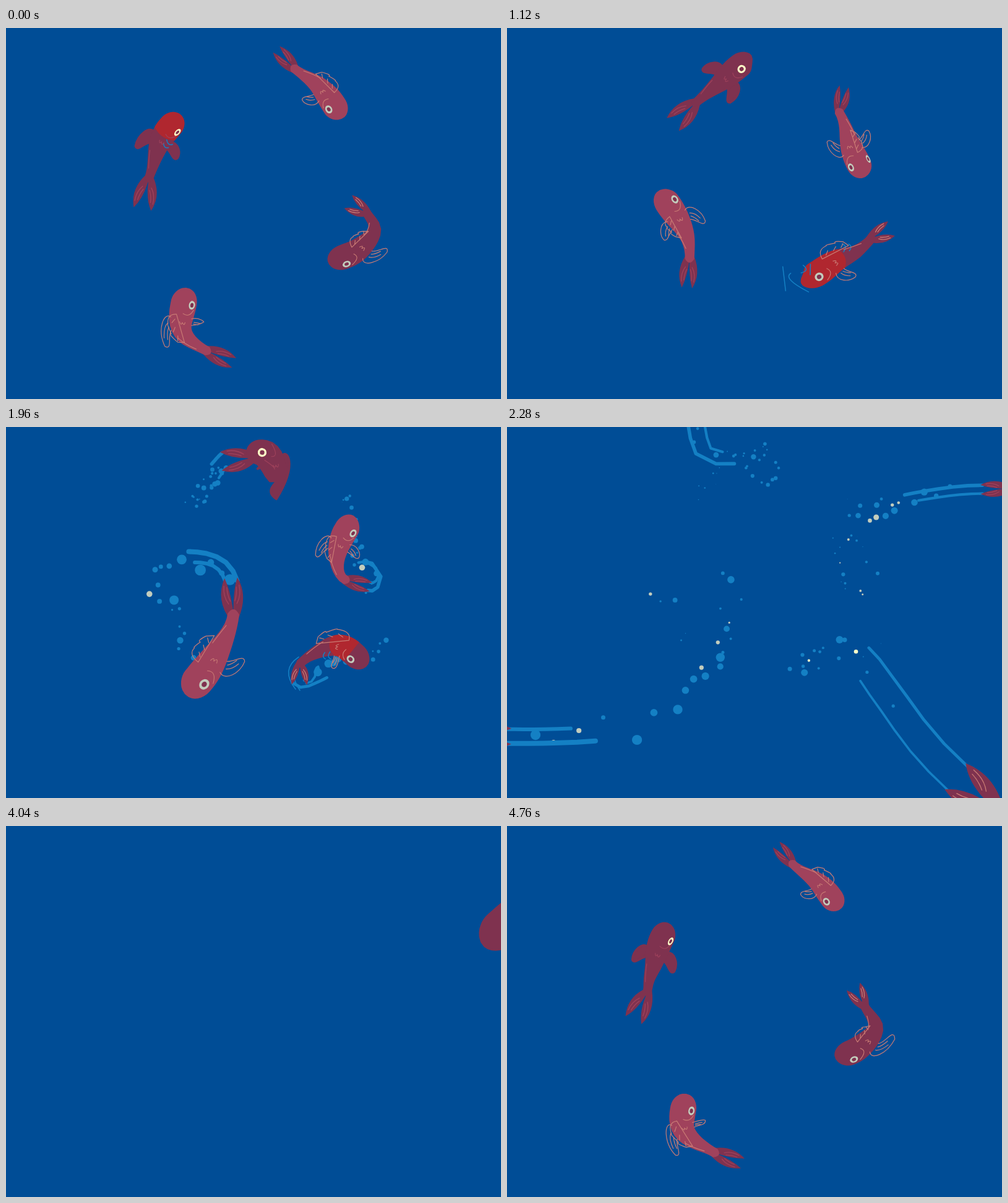
An HTML page for the animation above (4.84 s loop, 800 px wide and 600 px high).

```html
<!DOCTYPE html>
<html lang="en">
<head>
<meta charset="utf-8">
<title>Koi pond</title>
<style>
html, body { margin: 0; width: 100%; height: 100%; overflow: hidden; background: #004d96; }
svg { display: block; width: 100%; height: 100%; }
</style>
</head>
<body>
<svg id="pond" viewBox="0 0 800 600" fill="none" stroke-linecap="round" stroke-linejoin="round"></svg>
<script>
const LOOP = 4840, DARK = '#7f324f', PINK = '#a0425c', RED = '#b0272f';
const BLUE = '#1480c4', LINE = '#c97b74', PALE = '#c3cdbd', CREAM = '#ffffc8';

const RAD = Math.PI / 180;
const clamp = (v, a, b) => Math.max(a, Math.min(b, v));
const rand = n => { const s = Math.sin(n * 127.1 + 3.7) * 43758.5453; return s - Math.floor(s); };
const fix = n => n.toFixed(1);
const at = ([x, y]) => fix(x) + ' ' + fix(y) + ' ';
const shape = (d, attrs) => `<path d="${d}" ${attrs}/>`;
const stroke = (d, color, w) => shape(d, `stroke="${color}" stroke-width="${w}"`);
const dot = (x, y, r, color) => `<circle cx="${fix(x)}" cy="${fix(y)}" r="${fix(r)}" fill="${color}"/>`;

const school = [], SUB = 12;

// every fish swims along one smooth route; its body lies on the route behind the head
function addFish(f) {
  const p = f.route, last = p.length - 1, get = i => p[clamp(i, 0, last)];
  f.pts = [];
  f.dist = [0];
  for (let i = 0; i <= last * SUB; i++) {
    const j = Math.min(last - 1, Math.floor(i / SUB)), k = i / SUB - j;
    f.pts.push([0, 1].map(c => {
      const [a, b, d, e] = [-1, 0, 1, 2].map(o => get(j + o)[c]);
      return b + k / 2 * (d - a + k * (2 * a - 5 * b + 4 * d - e + k * (3 * (b - d) + e - a)));
    }));
    if (i) f.dist.push(f.dist[i - 1] + Math.hypot(f.pts[i][0] - f.pts[i - 1][0], f.pts[i][1] - f.pts[i - 1][1]));
  }
  school.push(f);
}

// keys: time, head's place on the route, scale, roll, tail turn
addFish({
  body: PINK, line: LINE, tailLine: PINK, eye: PALE, two: true, pale: PALE,
  len: 115, w: 20, tl: 42, ts: 10, drop: 4.6, count: 56, foam: 7,
  route: [[425, -160], [428, -60], [436, 25], [462, 62], [507, 95], [540, 142], [557, 195], [579, 241],
    [588, 257], [543, 243], [537, 197], [566, 147], [630, 120], [720, 104], [800, 100], [1000, 95]],
  keys: [[-320, 3.7, .95, -25, 0], [-80, 4.88, .95, -25, 0], [0, 5.1, 1, -25, 0], [480, 6, 1.03, 0, -15],
    [1120, 7, 1, -13, 46], [1680, 7.5, 1, -18, 30], [1960, 11, 1, -18, 0], [2280, 14.57, 1, -18, 0]]
});
addFish({
  body: DARK, line: LINE, tailLine: LINE, eye: PALE, pale: CREAM,
  len: 128, w: 20, tl: 36, ts: 20, drop: 5.4, count: 34, foam: 6,
  red: [[240, 0, 0], [480, 0, .42], [1120, 0, .55], [1760, .1, .6], [2000, .3, .5], [2040, .5, .5]],
  route: [[960, -20], [870, 95], [767, 188], [640, 205], [570, 240], [575, 285], [596, 325], [570, 358], [531, 377],
    [498, 399], [475, 406], [468, 392], [495, 368], [541, 354], [582, 388], [620, 440], [690, 530], [798, 624], [1200, 930]],
  keys: [[-320, 6, 1.2, 18, 0], [-80, 8, 1, 18, -10], [0, 8.25, 1, 18, -35], [480, 9.05, 1, 44, 0],
    [1120, 10, 1.05, 43, 60], [1680, 10.5, 1.05, 30, 50], [1960, 14, 1, -29, 0], [2280, 17.5, 2.2, -29, 0]]
});
addFish({
  body: PINK, line: LINE, tailLine: PINK, eye: PALE, two: true, pale: PALE,
  len: 124, w: 21, tl: 48, ts: 10, drop: 7.8, count: 44, foam: 10,
  route: [[520, 760], [440, 610], [385, 550], [335, 528], [285, 490], [291, 420], [292, 340], [247, 262],
    [246, 228], [300, 212], [355, 235], [368, 300], [343, 362], [289, 432], [200, 485], [60, 500], [-250, 495]],
  keys: [[-320, 3.5, 1, -16, 0], [-80, 4.83, 1, -16, 0], [0, 5, 1, -16, 0], [480, 6, 1, 0, 0],
    [1120, 7, 1, -18, 0], [1680, 7.6, 1, -10, 0], [1960, 13, 1.24, 32, 0], [2280, 16, 1.5, 32, 0]]
});
addFish({
  body: DARK, line: PINK, tailLine: PINK, eye: CREAM, solid: true,
  len: 118, w: 20, tl: 52, ts: 16, drop: 4, count: 52, foam: 7,
  red: [[-80, 0, 0], [0, 0, .34], [480, .2, .62], [800, .5, .6], [880, .6, .6]],
  route: [[-60, 560], [60, 430], [205, 310], [232, 240], [252, 178], [290, 135], [340, 92], [397, 50],
    [436, 80], [424, 45], [388, 41], [335, 40], [308, 0], [280, -250]],
  keys: [[-320, 2.7, 1, -5, 0], [-80, 4.4, 1, -5, 0], [0, 4.85, 1, -5, 0], [480, 5.3, .95, -26, 0],
    [1120, 7, 1, -42, 0], [1680, 7.5, 1, -46, 0], [1960, 10, 1.05, -62, 25], [2280, 12.8, 1, -40, 0]]
});

// linear keys; the ends run on when free is set
function sample(rows, t, free) {
  let i = rows.findIndex(r => r[0] > t);
  if (i < 0) i = rows.length - 1;
  const a = rows[Math.max(0, i - 1)], b = rows[Math.max(1, i)];
  let k = (t - a[0]) / (b[0] - a[0]);
  if (!free) k = clamp(k, 0, 1);
  return a.map((v, j) => v + (b[j] - v) * k).slice(1);
}

function along(f, s) {
  const d = f.dist;
  let lo = 0, hi = d.length - 1;
  while (hi - lo > 1) {
    const m = lo + hi >> 1;
    if (d[m] > s) hi = m; else lo = m;
  }
  const k = (s - d[lo]) / (d[hi] - d[lo]), a = f.pts[lo], b = f.pts[hi];
  return [a[0] + (b[0] - a[0]) * k, a[1] + (b[1] - a[1]) * k];
}

function poseAt(f, t) {
  const [place, scale, roll, turn] = sample(f.keys, t, true);
  const i = clamp(place * SUB, 0, f.dist.length - 1.01), n = Math.floor(i);
  const p = { f, roll, len: f.len * scale, w: f.w * scale, tl: f.tl * scale, ts: f.ts };
  p.s = f.dist[n] + (f.dist[n + 1] - f.dist[n]) * (i - n);
  p.joint = along(f, p.s - p.len);
  const end = along(f, p.s - p.len - p.tl * .8);
  p.ta = Math.atan2(end[1] - p.joint[1], end[0] - p.joint[0]) + turn * RAD;
  return p;
}

const girth = u => {
  const k = clamp(u / .2, 0, 1), s = clamp((u - .25) / .75, 0, 1);
  return Math.sqrt(k * (2 - k)) * (1 - .64 * s * s * (3 - 2 * s));
};

function heading(p, u) {
  const s = p.s - u * p.len, a = along(p.f, s - 9), b = along(p.f, s + 9);
  return Math.atan2(b[1] - a[1], b[0] - a[0]);
}

// point at u from head to tail, l half widths to the right
function spot(p, u, l) {
  const [x, y] = along(p.f, p.s - u * p.len), a = heading(p, u), o = l * p.w;
  return [x - Math.sin(a) * o, y + Math.cos(a) * o];
}

function polar(p, k, deg) {
  const a = p.ta + deg * RAD;
  return [p.joint[0] + Math.cos(a) * k * p.tl, p.joint[1] + Math.sin(a) * k * p.tl];
}

function trunk(p, a, b) {
  const left = [], right = [], n = 24;
  for (let i = 0; i <= n; i++) {
    const u = a + (b - a) * (i / n) ** 1.5, g = girth(u);
    right.push(at(spot(p, u, g)));
    left.unshift(at(spot(p, u, -g)));
  }
  return 'M' + right.join('L') + 'Q' + at(spot(p, b + .1, 0)) + left.join('L') + 'Z';
}

function tail(f, p) {
  let lobes = '', lines = '';
  for (const s of [-1, 1]) {
    const q = (k, d) => at(polar(p, k, s * d)), ts = p.ts;
    lobes += `M${at(spot(p, .97, -s * .36))}Q${q(.65, ts + 32)}${q(1, ts)}Q${q(.6, 2)}${q(0, 0)}Z`;
    lines += `M${q(.3, ts + 12)}Q${q(.55, ts + 17)}${q(.8, ts + 5)}M${q(.36, ts)}Q${q(.55, ts + 4)}${q(.74, ts)}`;
  }
  return shape(lobes, `fill="${DARK}"`) + stroke(lines, f.tailLine, 1.3);
}

function sideFin(f, p, s) {
  const q = (u, l) => at(spot(p, u, l * s));
  const d = `M${q(.4, .8)}C${q(.35, 1.35)}${q(.5, 1.9)}${q(.62, 1.75)}C${q(.68, 1.5)}${q(.56, 1.2)}${q(.53, .8)}`;
  if (f.solid) return shape(d + 'Z', `fill="${DARK}" stroke="${DARK}" stroke-width="4"`);
  return stroke(d + `M${q(.46, 1)}Q${q(.49, 1.35)}${q(.57, 1.5)}M${q(.5, .95)}Q${q(.53, 1.15)}${q(.59, 1.3)}`, f.line, 1.2);
}

function backFin(f, p) {
  const d = Math.sin(clamp(p.roll * 2.4, -90, 90) * RAD), s = d < 0 ? -1 : 1;
  const base = d * .8 - s * .1, top = d + s * .38, q = (u, l) => at(spot(p, u, l));
  let edge = 'M' + q(.36, base), ribs = '';
  for (let i = 0; i < 3; i++) {
    const u = .4 + i * .09;
    edge += `Q${q(u - .03, top + s * .12)}${q(u + .07, top - s * i * .12)}`;
    ribs += `M${q(u + .02, base + s * .08)}L${q(u + .06, base + s * .3)}`;
  }
  return stroke(edge + `L${q(.7, base)}Z` + ribs, f.line, 1.2);
}

function marks(f, p) {
  const n = p.roll > 0 ? -1 : 1, q = (u, l) => at(spot(p, u, l * n));
  return stroke(`M${q(.27, .85)}Q${q(.39, .6)}${q(.34, .1)}` +
    `M${q(.45, -.1)}Q${q(.51, 0)}${q(.46, .1)}Q${q(.52, .22)}${q(.46, .32)}` +
    `M${q(.62, -.55)}Q${q(.72, -.48)}${q(.86, -.27)}`, f.line, 1.1);
}

function eyes(f, p) {
  const n = p.roll > 0 ? -1 : 1, a = fix(heading(p, .2) / RAD), r = p.w * .34;
  return (f.two ? [1, -1] : [n]).map(s => {
    const deg = p.roll + 62 * s;
    if (Math.abs(deg) > 76) return '';
    const [x, y] = spot(p, .21, Math.sin(deg * RAD) * .9), k = Math.max(.4, Math.cos(deg * RAD));
    const oval = (m, c) => `<ellipse rx="${fix(r * m)}" ry="${fix(r * m * k)}" fill="${c}"/>`;
    return `<g transform="translate(${fix(x)} ${fix(y)}) rotate(${a})">${oval(1, f.eye)}${oval(.52, DARK)}</g>`;
  }).join('');
}

// the red part out of the water, with small waves at its ends
function surface(f, p, t) {
  const [a, b] = sample(f.red, t);
  if (b - a < .02) return '';
  const q = (u, l) => at(spot(p, u, l));
  let waves = `M${q(b + .06, .4)}Q${q(b + .14, .7)}${q(b + .08, 1)}M${q(b + .13, .3)}Q${q(b + .2, .5)}${q(b + .16, .8)}`;
  if (!f.solid && t < 1700) for (const s of [-1, 1])
    waves += `M${q(.06, s * 1.05)}Q${q(-.08, s * 1.1)}${q(-.1, s * .4)}M${q(-.04, s * 1.4)}L${q(-.13, s * 1.1)}`;
  return shape(trunk(p, a, b), `fill="${RED}"`) + stroke(waves, BLUE, 1.5);
}

function drawFish(f, t) {
  const p = poseAt(f, t), near = p.roll > 0 ? -1 : 1;
  let fins = sideFin(f, p, near);
  if (f.solid || (f.two && Math.abs(p.roll) < 22)) fins += sideFin(f, p, -near);
  let out = tail(f, p) + (f.solid ? fins : '') + shape(trunk(p, 0, 1), `fill="${f.body}"`);
  if (f.red) out += surface(f, p, t);
  return out + marks(f, p) + (f.solid ? '' : fins + backFin(f, p)) + eyes(f, p);
}

// drops left along the way of the tail, shrinking with age
function splash(f, t, seed) {
  let out = '';
  for (let i = 0; i < f.count; i++) {
    const n = seed * 500 + i * 4, born = 1700 + 570 * i / f.count;
    const life = 230 + 380 * rand(n) ** 2, age = t - born;
    if (age < 0 || age > life) continue;
    const p = poseAt(f, born), [x, y] = polar(p, .85, (rand(n + 1) - .5) * 40);
    const r = f.drop * (.35 + rand(n + 2)) * Math.sqrt(1 - age / life);
    out += dot(x + (rand(n + 2) - .5) * 12, y + (rand(n + 3) - .5) * 14, r, !f.solid && rand(n + 3) > .86 ? f.pale : BLUE);
  }
  if (t >= 1800 && t < 2300) for (const s of [-1, 1]) {
    const pts = [];
    for (let k = 0; k <= 6; k++) {
      const p = poseAt(f, t - k * (s > 0 ? 9 : 7));
      pts.push(at(polar(p, .92, s * p.ts)));
    }
    out += stroke('M' + pts.join('L'), BLUE, f.foam * (s > 0 ? .8 : .6));
  }
  return out;
}

// the picture steps every 80 ms, every 40 ms during the dash
function step(t) {
  if (t < 1840) return Math.floor(t / 80) * 80;
  if (t < 2360) return Math.floor(t / 40) * 40;
  return 2360 + Math.floor((t - 2360) / 80) * 80;
}

function render(t) {
  let out = '';
  if (t >= 1840 && t < 2080) out += stroke('M473 372q-30 20-5 52M480 374q-26 22-5 52', BLUE, 1.6);
  if (t >= 1700 && t < 2840) school.forEach((f, i) => { out += splash(f, t, i + 1); });
  const swim = t >= 4040 ? t - LOOP : t;
  if (swim < 2400) for (const f of school) out += drawFish(f, swim);
  document.getElementById('pond').innerHTML = out;
}

let last = -1;
const start = performance.now();
function tick() {
  const t = step((performance.now() - start) % LOOP);
  if (t !== last) render(last = t);
  requestAnimationFrame(tick);
}
tick();
</script>
</body>
</html>
```
